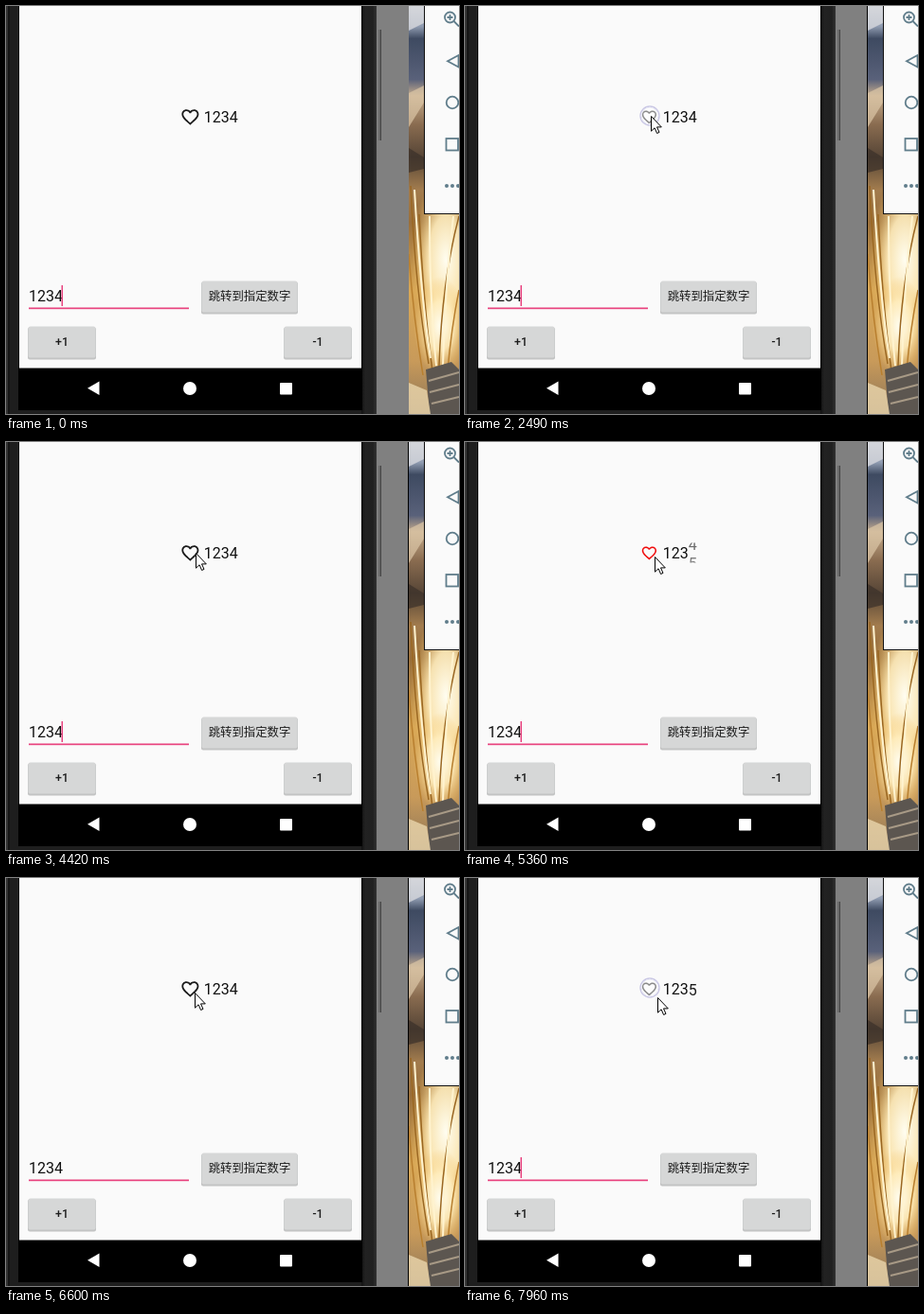
These frames come from a looping animation (478 px wide and 431 px high, 7.99 s). An HTML page:

```html
<!DOCTYPE html>
<html lang="zh">
<head>
<meta charset="utf-8">
<title>Like counter</title>
<style>
  html, body { margin: 0; width: 100%; height: 100%; overflow: hidden; background: #808080; }
  svg { display: block; width: 478px; height: 431px; }
  text { font-family: Roboto, "Noto Sans CJK SC", "Noto Sans CJK", sans-serif; font-size: 16px; fill: #111; }
  .btn text { font-size: 12.4px; font-weight: 500; fill: #1d1d1d; text-anchor: middle; }
  .btn .cjk { font-weight: 400; }
  .icons { fill: none; stroke: #607d8b; stroke-width: 1.8; }
</style>
</head>
<body>
<svg viewBox="0 0 478 431">
  <defs>
    <linearGradient id="wall" x2="0" y2="1">
      <stop offset="0" stop-color="#b9bfc9"/>
      <stop offset=".05" stop-color="#8f9bb0"/>
      <stop offset=".08" stop-color="#3e4a61"/>
      <stop offset=".18" stop-color="#59617a"/>
      <stop offset=".22" stop-color="#c4ab8c"/>
      <stop offset=".29" stop-color="#8a6c50"/>
      <stop offset=".37" stop-color="#564536"/>
      <stop offset=".45" stop-color="#a27c4e"/>
      <stop offset=".53" stop-color="#9a6f3a"/>
      <stop offset=".7" stop-color="#d9a856"/>
      <stop offset=".87" stop-color="#c89a5a"/>
      <stop offset="1" stop-color="#8d7558"/>
    </linearGradient>
    <radialGradient id="glow">
      <stop offset="0" stop-color="#fffdf0"/>
      <stop offset=".5" stop-color="#ffedbd" stop-opacity=".9"/>
      <stop offset="1" stop-color="#f1c26a" stop-opacity="0"/>
    </radialGradient>
    <linearGradient id="rim">
      <stop offset="0" stop-color="#111"/>
      <stop offset=".25" stop-color="#222"/>
      <stop offset=".75" stop-color="#202020"/>
      <stop offset="1" stop-color="#333"/>
    </linearGradient>
    <clipPath id="photo"><rect x="425" width="53" height="431"/></clipPath>
    <clipPath id="reel"><rect x="234" y="106.5" width="14" height="21"/></clipPath>
  </defs>

  <rect width="478" height="431" fill="#808080"/>

  <!-- wallpaper -->
  <g clip-path="url(#photo)">
    <rect x="425" width="53" height="431" fill="url(#wall)"/>
    <path d="M425 0h16v18l-16 8z" fill="#dfe0e2" opacity=".7"/>
    <path d="M425 92l16-8v18l-16 26z" fill="#dcc6a7" opacity=".7"/>
    <path d="M425 150l16 10v12l-16 4z" fill="#3a3029" opacity=".7"/>
    <ellipse cx="464" cy="268" rx="36" ry="92" fill="url(#glow)"/>
    <ellipse cx="458" cy="338" rx="28" ry="52" fill="url(#glow)"/>
    <g fill="none" stroke="#9a6722" stroke-width="1.5">
      <path d="M427 190Q432 300 446 378M436 220Q440 310 450 386M478 222Q460 290 457 380"/>
      <path d="M425 262Q430 330 440 390M478 300Q470 340 466 385" stroke="#b87f2f"/>
    </g>
    <g fill="none" stroke="#fff3cf" stroke-width="2">
      <path d="M431 194Q437 300 448 372M447 222Q447 310 454 380M472 222Q463 300 461 380"/>
    </g>
    <path d="M443 384L470 376L478 384V431H447z" fill="#5c5650"/>
    <path d="M446 396l32-9M447 408l31-8M449 420l29-7" stroke="#a89a86" stroke-width="2"/>
    <path d="M425 398l19 8l4 25h-23z" fill="#ead6ac" opacity=".8"/>
  </g>
  <rect id="edge" x="424" width="1" height="431" fill="#000"/>

  <!-- emulator toolbar -->
  <rect x="441" width="37" height="220" fill="#111"/>
  <rect x="442" width="36" height="219" fill="#fafafa"/>
  <g class="icons">
    <circle cx="468.500" cy="12" r="5.500"/>
    <path d="M472.500 16L478 21.500M465.500 12h6M468.500 9v6"/>
    <path d="M477.500 52v12.500L466 58.200z"/>
    <circle cx="471" cy="102" r="6.300"/>
    <rect x="464.500" y="140" width="12.500" height="12.500"/>
  </g>
  <g fill="#607d8b"><circle cx="465" cy="190" r="2"/><circle cx="471" cy="190" r="2"/><circle cx="477" cy="190" r="2"/></g>

  <!-- phone -->
  <rect x="393" y="25" width="3" height="117" fill="#6a6a6a"/>
  <path d="M395.500 25v117" stroke="#444"/>
  <rect width="390" height="431" fill="#1e1e1e"/>
  <rect width="2" height="431" fill="#333"/>
  <rect x="2" width="2" height="431" fill="#151515"/>
  <rect x="375" width="16" height="431" fill="url(#rim)"/>
  <rect x="13" width="363" height="427" fill="#000"/>
  <rect x="14" width="361" height="382.500" fill="#fafafa"/>
  <g fill="#fff">
    <path d="M98.500 396.500v14.500L86 403.700z"/>
    <circle cx="194" cy="404" r="7"/>
    <rect x="289" y="398" width="13" height="12.500" rx="1"/>
  </g>

  <!-- form -->
  <text x="24" y="312" fill="#222">1234</text>
  <rect x="24" y="318.500" width="169" height="1.700" fill="#e8437f"/>
  <rect id="caret" x="58.500" y="295" width="1.500" height="22" fill="#e8437f"/>
  <g id="buttons" class="btn"></g>

  <!-- like counter -->
  <path id="heart" d="M16.500 3c-1.740 0-3.410.810-4.500 2.090C10.910 3.810 9.240 3 7.500 3 4.420 3 2 5.420 2 8.500c0 3.780 3.400 6.860 8.550 11.540L12 21.350l1.450-1.320C18.600 15.360 22 12.280 22 8.500 22 5.420 19.580 3 16.500 3zm-4.400 15.550l-.1.1-.1-.1C7.140 14.240 4 11.390 4 8.500 4 6.500 5.500 5 7.500 5c1.540 0 3.040.990 3.570 2.360h1.870C13.460 5.990 14.960 5 16.500 5c2 0 3.500 1.500 3.500 3.500 0 2.890-3.140 5.740-7.900 10.050z"/>
  <text x="208.700" y="123">123</text>
  <g clip-path="url(#reel)">
    <text id="four" x="235.650">4</text>
    <text id="five" x="235.650">5</text>
  </g>
  <g id="touch">
    <circle r="10" fill="#fff" fill-opacity=".5" stroke="#c9c7e4" stroke-width="1.400"/>
    <circle r="8.800" fill="none" stroke="#ececf6"/>
  </g>
  <path id="cursor" d="M.5 .5V16.200L4.100 12.800L6.600 18.500L9 17.400L6.500 11.900H11.300z" fill="#fff" stroke="#000"/>
</svg>
<script>
const LOOP = 7990, ROW = 20, ROLL = 360, SMALL = 0.85;
const $ = id => document.getElementById(id);
const clamp = v => Math.min(1, Math.max(0, v));
const ease = v => (1 - Math.cos(Math.PI * clamp(v))) / 2;

// time, x, y of the pointer tip
const path = [
  [40, 369, 403], [200, 320, 302], [400, 262, 232], [520, 235, 195], [620, 216, 162],
  [700, 201, 112], [760, 201, 117], [840, 201, 117], [890, 200, 116],
  [1340, 200, 116], [1420, 201, 117], [1510, 200, 116], [2240, 200, 116], [2400, 196, 116],
  [2830, 196, 116], [3050, 206, 118], [3340, 215, 122], [3750, 215, 122], [4050, 208, 114],
  [4420, 200, 117], [4600, 200, 117], [4760, 197, 116], [5110, 197, 116], [5400, 200, 122],
  [5830, 199, 118], [5920, 199, 117], [6010, 199, 118], [6090, 202, 126], [6350, 203, 130],
  [6670, 198, 119], [6720, 197, 119], [6760, 198, 121], [6940, 198, 121], [7130, 198, 122],
  [7310, 199, 133], [7550, 202, 130], [7730, 197, 117], [7910, 197, 117], [7960, 203, 126]
];

// touches: press, release, centre, and the state they lead to
const taps = [
  { down: 2300, up: 2860, x: 195, y: 116 },
  { down: 4680, up: 5190, x: 195, y: 116, liked: true },
  { down: 5925, up: 6000, x: 198, y: 117, liked: false },
  { down: 6950, up: 7142, x: 196, y: 118, liked: true },
  { down: 7780, up: 7910, x: 195, y: 116, liked: false }
];

// the caret flips at each of these times, starting visible
const blinks = [40, 370, 860, 1360, 1880, 2380, 2880, 3340, 3850, 4360, 4840, 5350, 5820, 6080, 6500, 6950, 7450, 7950];

const buttons = [
  [206, 290, 102, "跳转到指定数字", "cjk", 311], [23, 338, 72, "+1", "", 359], [293, 338, 72, "-1", "", 359]
];
$("buttons").innerHTML = buttons.map(([x, y, w, label, cls, base]) =>
  `<rect x="${x}" y="${y + 1.5}" width="${w}" height="34" rx="2" fill="#c3c4c4"/>
   <rect x="${x + .5}" y="${y + .5}" width="${w - 1}" height="33" rx="2" fill="#d6d7d7"/>
   <text class="${cls}" x="${x + w / 2}" y="${base}">${label}</text>`).join("");

function pointerAt(t) {
  const i = path.findIndex(p => p[0] > t);
  if (i < 0) return path[path.length - 1].slice(1);
  const [t0, x0, y0] = path[Math.max(0, i - 1)], [t1, x1, y1] = path[i];
  const k = t1 > t0 ? clamp((t - t0) / (t1 - t0)) : 0;
  return [x0 + (x1 - x0) * k, y0 + (y1 - y0) * k];
}

function place(el, x, y) {
  el.setAttribute("transform", `translate(${x} ${y})`);
}

function setDigit(el, offset) {
  el.setAttribute("y", 123 + offset);
  el.setAttribute("opacity", clamp(1 - Math.abs(offset) / ROW * 0.85));
}

function draw(t) {
  let roll = 0, liked = false, scale = 1, dot = 0;
  for (const tap of taps) {
    if (t < tap.down) break;
    const since = t - tap.up;
    const press = ease((t - tap.down) / 80), back = ease((since - 200) / 200);
    scale = 1 - (1 - SMALL) * press * (1 - back);
    dot = since < 50 ? clamp((t - tap.down) / 40) : clamp((110 - since) / 60);
    place($("touch"), tap.x, tap.y);
    if (tap.liked === undefined || since < 0) continue;
    roll = tap.liked ? ease(since / ROLL) : 1 - ease(since / ROLL);
    if (since > 30) liked = tap.liked;
  }
  $("touch").setAttribute("opacity", dot);
  $("heart").setAttribute("fill", liked ? "#f00d0d" : "#1a1a1a");
  $("heart").setAttribute("transform", `translate(194.400 117.500) scale(${0.9 * scale}) translate(-12 -12.200)`);
  setDigit($("four"), -ROW * roll);
  setDigit($("five"), ROW * (1 - roll));

  const flips = blinks.filter(b => b <= t).length;
  $("caret").setAttribute("opacity", flips % 2 ? 0 : 1);
  $("edge").setAttribute("opacity", t >= 2400 ? 1 : 0);
  $("cursor").setAttribute("opacity", t >= 40 ? 1 : 0);
  const [x, y] = pointerAt(t);
  place($("cursor"), Math.round(x), Math.round(y));
}

const start = performance.now();
function tick() {
  draw((performance.now() - start) % LOOP);
  requestAnimationFrame(tick);
}
tick();
</script>
</body>
</html>
```
